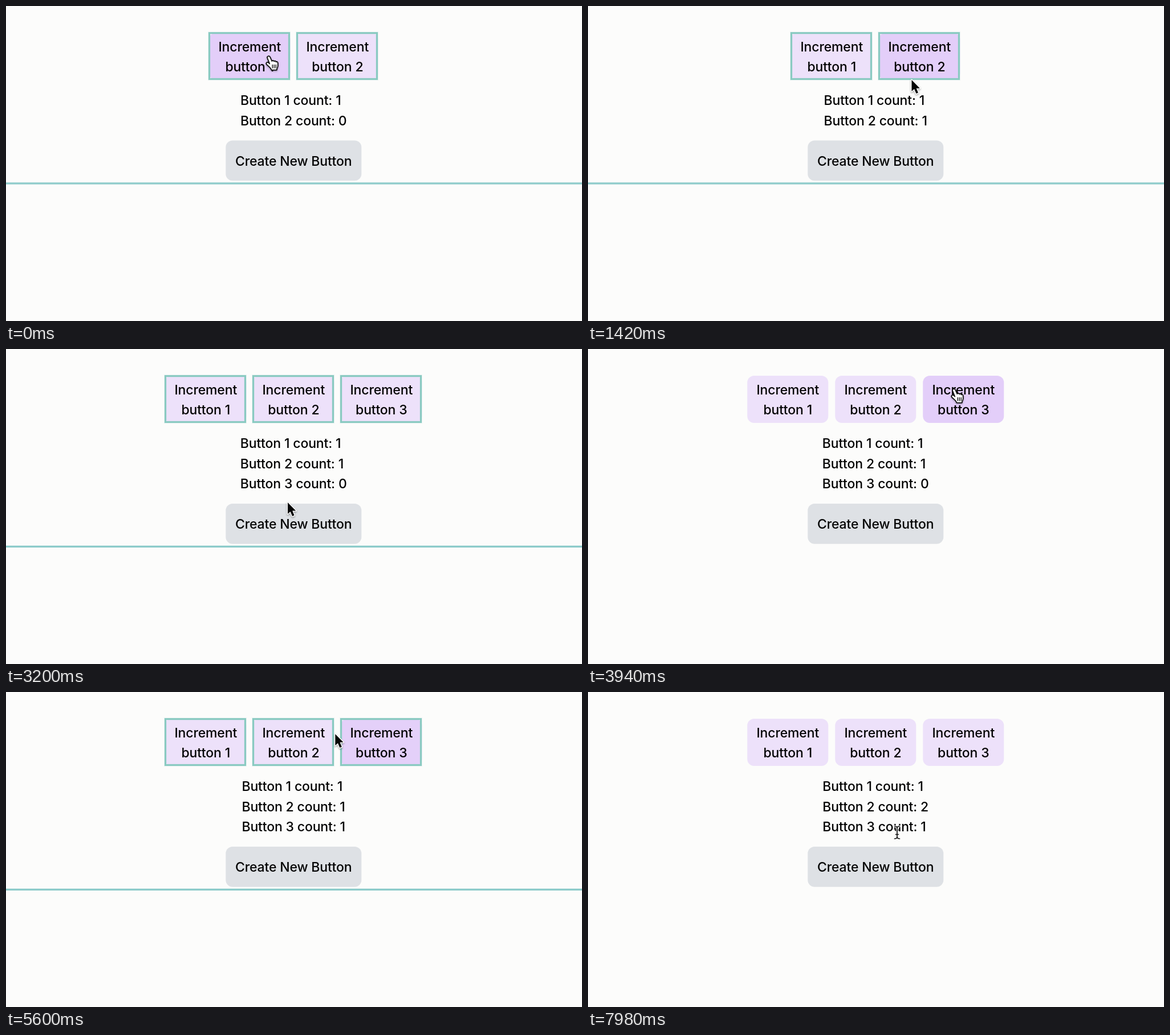
Recreate the animation shown at these times as an HTML page with a canvas. Size 1010 by 554 pixels, loop 8 s.

```html
<!DOCTYPE html>
<html lang="en">
<head>
<meta charset="utf-8">
<title>Increment buttons</title>
<style>
  html, body { margin: 0; width: 100%; height: 100%; overflow: hidden; background: #fcfcfb; }
  canvas { display: block; width: 1010px; height: 554px; }
</style>
</head>
<body>
<canvas id="stage"></canvas>
<script>
const LOOP = 8000;
const W = 1010, H = 554, MID = 504;
const ROW = 35.5;
const FLASH = 720, FADE = 150;

const canvas = document.getElementById('stage');
const ctx = canvas.getContext('2d');
const dpr = window.devicePixelRatio || 1;
canvas.width = W * dpr;
canvas.height = H * dpr;

// Moments of state changes; the first click happened before the loop starts.
const CLICKS = [
  { at: -240, button: 0 },
  { at: 840, button: 1 },
  { at: 2860, button: -1 },
  { at: 4920, button: 2 },
  { at: 6700, button: 1 }
];

// Pointer hot spot: time, x, y
const PATH = [
  [0, 461, 89], [150, 461, 89], [700, 565, 98], [1250, 566, 98],
  [1390, 567, 127], [1420, 567.5, 130], [1560, 566, 140], [1660, 566, 140],
  [2350, 494, 270], [3320, 494, 270], [3850, 642, 71], [4150, 642, 71],
  [4320, 650, 84], [5250, 650, 84], [5570, 588, 75], [5600, 577.5, 74],
  [5700, 562, 74], [5900, 551, 78.5], [7250, 551, 78.5], [7620, 548, 120],
  [7980, 542, 247], [8000, 542, 247]
];

const smooth = v => v * v * (3 - 2 * v);

function slope(i, k) {
  if (i < 1 || i > PATH.length - 2) return 0;
  const rate = j => (PATH[j + 1][k] - PATH[j][k]) / (PATH[j + 1][0] - PATH[j][0]);
  const a = rate(i - 1), b = rate(i);
  return a * b > 0 ? 2 * a * b / (a + b) : 0;
}

function pointerAt(t) {
  let i = 0;
  while (i < PATH.length - 2 && t >= PATH[i + 1][0]) i++;
  const span = PATH[i + 1][0] - PATH[i][0];
  const u = Math.min(1, (t - PATH[i][0]) / span);
  const axis = k => {
    const s = smooth(u);
    return PATH[i][k] * (1 - s) + PATH[i + 1][k] * s
      + span * u * (1 - u) * ((1 - u) * slope(i, k) - u * slope(i + 1, k));
  };
  return { x: axis(1), y: axis(2) };
}

function stateAt(t) {
  const counts = [0, 0];
  let flash = false;
  for (const { at, button } of CLICKS) {
    if (t < at) break;
    if (button < 0) counts.push(0);
    else counts[button]++;
    flash = t < at + FLASH;
  }
  return { counts, flash };
}

function layout(n) {
  const left = MID + .3 - (154 * n - 12) / 2;
  const buttons = Array.from({ length: n }, (_, i) => ({ x: left + 154 * i, y: 47, w: 142, h: 83 }));
  const create = { x: 385.3, y: 165.5 + ROW * n, w: 238, h: 70.7 };
  const text = { x: 411, y: 149, w: 186, h: ROW * n };
  return { buttons, create, text, bottom: 241 + ROW * n };
}

const inside = (p, r) => p.x >= r.x && p.x < r.x + r.w && p.y >= r.y && p.y < r.y + r.h;

// Share of the last FADE ms that the pointer spent over a control
function hover(t, pick) {
  const steps = 15;
  let hits = 0;
  for (let i = 0; i < steps; i++) {
    const s = Math.max(0, t - FADE * i / steps);
    const box = pick(layout(stateAt(s).counts.length));
    if (box && inside(pointerAt(s), box)) hits++;
  }
  return smooth(hits / steps);
}

function mix(a, b, k) {
  return `rgb(${a.map((v, i) => Math.round(v + (b[i] - v) * k)).join(',')})`;
}

function roundBox(r, fill) {
  ctx.beginPath();
  ctx.roundRect(r.x, r.y, r.w, r.h, 12);
  ctx.fillStyle = fill;
  ctx.fill();
}

// Baselines sit on whole pixels.
function label(str, x, y, align = 'center') {
  ctx.textAlign = align;
  ctx.fillStyle = '#030303';
  ctx.fillText(str, x, Math.floor(y));
}

function outline(r) {
  const edge = [r.x + .2, r.y + .5, r.w - 2, r.h - 2];
  ctx.lineWidth = 5;
  ctx.strokeStyle = 'rgba(150,200,200,.2)';
  ctx.strokeRect(...edge);
  ctx.lineWidth = 3;
  ctx.strokeStyle = '#89cac1';
  ctx.strokeRect(...edge);
}

function shadow(on) {
  ctx.shadowColor = on ? 'rgba(0,0,0,.35)' : 'transparent';
  ctx.shadowBlur = on ? 3 * dpr : 0;
  ctx.shadowOffsetY = on ? 1.5 * dpr : 0;
}

const ARROW = new Path2D('M0 0V20L4.6 15.9L8 24L11.5 22.5L8.2 14.6H14.3Z');
const HAND = new Path2D('M-2.6 2.5C-3.6 -.8 .6 -2 2 1L5.3 8.2C6 6.3 8.5 6.6 9 8.6' +
  'C10 7 12 7.6 12.5 9.6C14 8.4 15.6 9.6 15.6 11.6V16C15.6 19 14 20 13.6 23.4H4.4' +
  'C3.6 19.5 -.4 17.4 -3.6 14C-6 11.2 -3 9 -.8 10.8L1.4 12.8Z');
const CREASES = new Path2D('M6.2 14.5V20M9.2 14.5V20M12.2 14.5V20');
const BEAM = new Path2D('M-4.5 -11C-1.5 -11 0 -10 0 -7.5C0 -10 1.5 -11 4.5 -11' +
  'M0 -8V8M-4.5 11C-1.5 11 0 10 0 7.5C0 10 1.5 11 4.5 11M-2.5 3.5H2.5');

function stroke(path, color, width) {
  ctx.strokeStyle = color;
  ctx.lineWidth = width;
  ctx.stroke(path);
}

function drawPointer(p, view) {
  ctx.save();
  ctx.translate(p.x, p.y);
  ctx.lineJoin = ctx.lineCap = 'round';
  if (inside(p, view.create) || view.buttons.some(b => inside(p, b))) {
    shadow(true);
    stroke(HAND, '#111', 2);
    shadow(false);
    ctx.fillStyle = '#fff';
    ctx.fill(HAND);
    stroke(HAND, '#111', 1.5);
    stroke(CREASES, '#111', 1.4);
  } else if (inside(p, view.text)) {
    stroke(BEAM, '#fff', 3.6);
    stroke(BEAM, '#111', 1.7);
  } else {
    shadow(true);
    stroke(ARROW, '#fff', 3);
    shadow(false);
    ctx.fillStyle = '#050505';
    ctx.fill(ARROW);
  }
  ctx.restore();
}

function draw(t) {
  const { counts, flash } = stateAt(t);
  const view = layout(counts.length);
  ctx.setTransform(dpr, 0, 0, dpr, 0, 0);
  ctx.fillStyle = '#fcfcfb';
  ctx.fillRect(0, 0, W, H);
  ctx.font = '450 23px Inter, "Open Sans", sans-serif';
  ctx.letterSpacing = '-0.15px';

  view.buttons.forEach((b, i) => {
    if (flash) {
      ctx.fillStyle = '#f1e8fb';
      ctx.fillRect(b.x, b.y, b.w - 1, b.h - 1);
    }
    roundBox(b, mix([237, 225, 250], [227, 206, 249], hover(t, v => v.buttons[i])));
    label('Increment', b.x + 71, 80);
    label('button ' + (i + 1), b.x + 71, 115);
    if (flash) outline(b);
  });

  const lines = counts.map((c, i) => `Button ${i + 1} count: ${c}`);
  const width = Math.max(...lines.map(s => ctx.measureText(s).width));
  lines.forEach((s, i) => label(s, MID + .2 - width / 2, 174.5 + ROW * i, 'left'));

  roundBox(view.create, mix([222, 225, 229], [210, 213, 219], hover(t, v => v.create)));
  label('Create New Button', MID + .2, view.create.y + 44.5);

  if (flash) {
    ctx.fillStyle = 'rgba(150,200,200,.2)';
    ctx.fillRect(0, view.bottom - 2.5, W, 5);
    ctx.fillStyle = '#8ccbca';
    ctx.fillRect(0, view.bottom - 1.5, W, 3);
  }
  drawPointer(pointerAt(t), view);
}

const start = performance.now();
function tick() {
  draw((performance.now() - start) % LOOP);
  requestAnimationFrame(tick);
}
tick();
</script>
</body>
</html>
```
